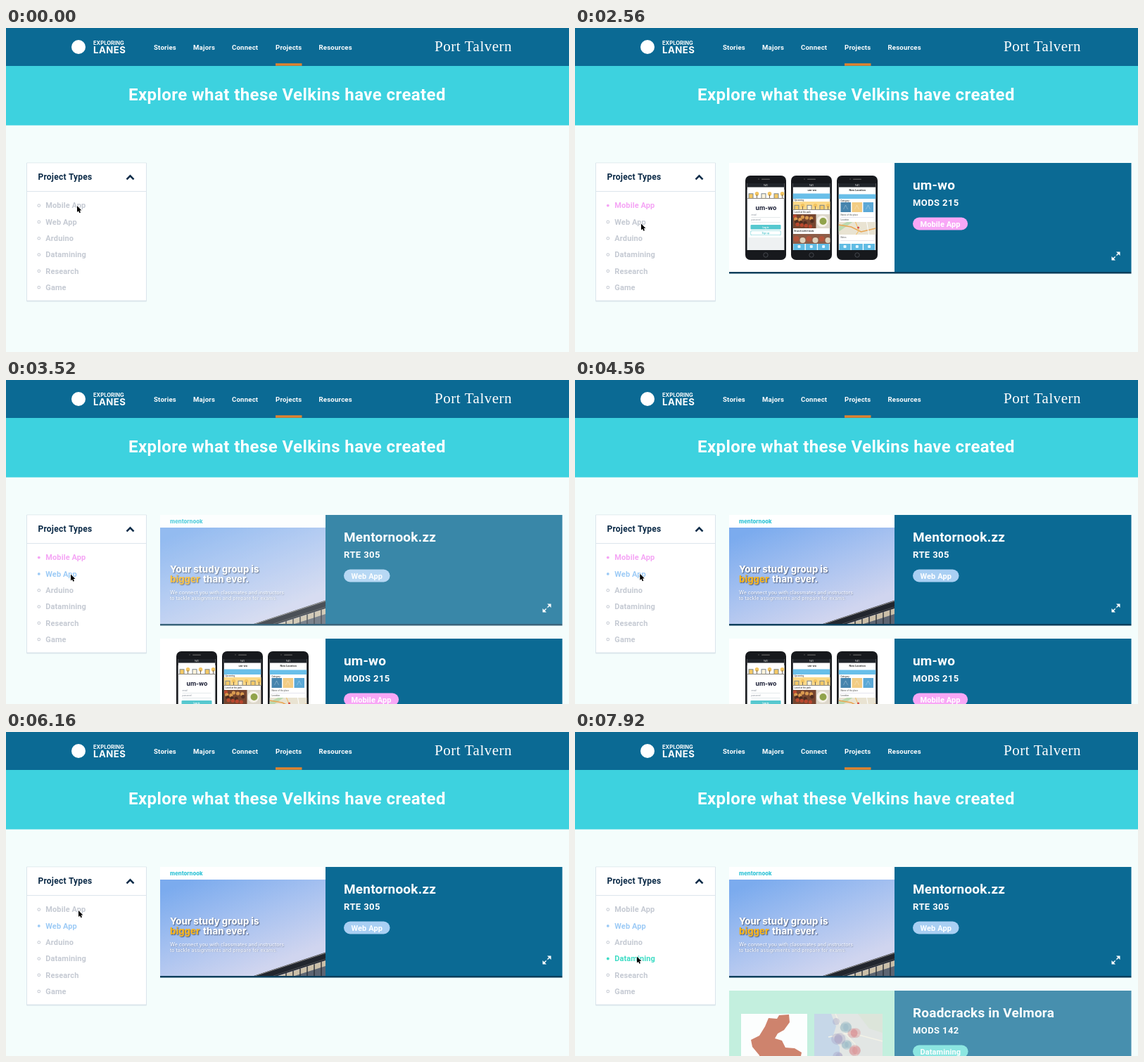
Recreate the animation shown at these times as an HTML page with a canvas. Size 800 px wide and 461 px high, loop 8 s.

```html
<!DOCTYPE html>
<html lang="en">
<head>
<meta charset="utf-8">
<title>Project browser</title>
<style>
  html, body { margin: 0; width: 100%; height: 100%; overflow: hidden; background: #f4fdfc; }
  canvas { display: block; width: 800px; height: 461px; }
</style>
</head>
<body>
<canvas id="stage" width="800" height="461"></canvas>
<script>
const LOOP = 8000, FADE = 400;
const CLICK = { mobileOn: 400, webOn: 3200, mobileOff: 5280, dataOn: 7624 };
const STEP = 176;
const BLUE = '#0b6a94', GRAY = '#c5cad3', PINK = '#f5a5f5', SKY = '#9dcbf6', TEAL = '#3fdcc5';
const ROBOTO = 'Roboto, sans-serif', INTER = 'Inter, sans-serif';
const ctx = document.getElementById('stage').getContext('2d');

function text(c, str, x, y, size, color, spacing = 0, family = ROBOTO, weight = 700) {
  c.font = `${weight} ${size}px ${family}`;
  c.letterSpacing = spacing + 'px';
  c.fillStyle = color;
  c.fillText(str, x, y);
}

function box(c, x, y, w, h, color, r = 0) {
  c.fillStyle = color;
  c.beginPath();
  c.roundRect(x, y, w, h, r);
  c.fill();
}

function dot(c, x, y, r, color) {
  c.fillStyle = color;
  c.beginPath();
  c.arc(x, y, r, 0, Math.PI * 2);
  c.fill();
}

function trace(c, pts) {
  c.beginPath();
  for (let i = 0; i < pts.length; i += 2) c.lineTo(pts[i], pts[i + 1]);
}

function shape(c, pts, color) {
  trace(c, pts);
  c.fillStyle = color;
  c.fill();
}

function line(c, pts, color, width) {
  trace(c, pts);
  c.strokeStyle = color;
  c.lineWidth = width;
  c.stroke();
}

function gradient(c, x0, y0, x1, y1, ...colors) {
  const g = c.createLinearGradient(x0, y0, x1, y1);
  colors.forEach((col, i) => g.addColorStop(i / (colors.length - 1), col));
  return g;
}

function town(c, x, y, h, back) {
  box(c, x, y, 54, h, back);
  for (let i = 0; i < 6; i++) {
    const px = x + 2 + i * 9, top = y + h * (i % 2 ? .3 : .4);
    if (i % 2) {
      dot(c, px + 3, top + 2, 2.8, '#f3c561');
      box(c, px + 2.5, top + 3, 1, y + h - top - 3, '#76685b');
    } else {
      box(c, px, top, 7, y + h - top, '#78848c');
      box(c, px + 1, top + 1, 5, y + h - top - 1, i % 4 ? '#fff4dc' : '#f5c966');
    }
  }
  box(c, x, y + h - 1, 54, 1, '#8f8a80');
}

function tiles(c, x) {
  for (let i = 0; i < 3; i++) {
    box(c, x + 1 + i * 17.3, 307, 16, 9, '#61bce4');
    box(c, x + 7 + i * 17.3, 309, 4, 4, '#e4f6ff', 1);
  }
}

function loginScreen(c, x) {
  town(c, x, 230, 13, '#fff');
  box(c, x, 243, 53, 73, '#eef1f2');
  box(c, x + 2, 243, 49, 55, '#fff');
  text(c, 'um-wo', x + 12, 259, 9.5, '#20243a', .1);
  text(c, 'email', x + 6, 267, 3, '#8a929c', 0, ROBOTO, 400);
  box(c, x + 6, 269, 41, .6, '#ccd3d8');
  text(c, 'password', x + 6, 274, 3, '#8a929c', 0, ROBOTO, 400);
  box(c, x + 6, 276, 41, .6, '#ccd3d8');
  box(c, x + 5, 280, 43, 6.5, '#56c8cf', 1);
  text(c, 'Log in', x + 22, 284.5, 3.2, '#fff');
  box(c, x + 5, 288.5, 43, 6.5, '#6fd0d6', 1);
  box(c, x + 5.6, 289.1, 41.8, 5.3, '#fff', 1);
  text(c, 'Sign up', x + 21, 293, 3.2, '#56c8cf');
}

function feedScreen(c, x) {
  text(c, 'um-wo', x + 21, 232, 4, '#333');
  box(c, x, 235.5, 53, 7.5, '#69bfe9');
  text(c, 'Upcoming', x + 2, 246, 3, '#666');
  town(c, x, 247, 12, '#fbd989');
  text(c, 'Lunch at the park', x + 2, 263, 3, '#666');
  box(c, x, 265, 53, 20, '#75452f');
  box(c, x + 33, 265, 20, 20, '#ddd7cb');
  dot(c, x + 42, 275, 8, '#f6f2e9');
  dot(c, x + 43, 275, 5, '#91a34b');
  for (let i = 0; i < 14; i++)
    dot(c, x + 3 + i * 7.3 % 28, 268 + i * 4.7 % 15, 2.6, ['#b9472e', '#d99a4f', '#4e2c20'][i % 3]);
  text(c, 'Brunch with friends', x + 2, 290, 3.2, '#444');
  box(c, x, 293, 53, 14, '#8d5d48');
  for (let i = 0; i < 6; i++) dot(c, x + 5 + i * 9, 300 + i % 2 * 2, 4, i % 2 ? '#dfd2bd' : '#b4553c');
  tiles(c, x);
}

function placeScreen(c, x) {
  text(c, 'New Location', x + 15, 232, 3.8, '#333');
  box(c, x, 236.5, 53, 6.5, '#69bfe9');
  text(c, 'Category', x + 3, 246.5, 3, '#666');
  ['#4684ad', '#f2cc83', '#5ba8d6'].forEach((col, i) => {
    box(c, x + 3 + i * 16, 248, 14.5, 14, col);
    line(c, [x + 7 + i * 16, 258, x + 10 + i * 16, 252, x + 13 + i * 16, 258], '#ffffff60', .8);
  });
  text(c, 'Name of the place', x + 3, 267, 3, '#888');
  box(c, x + 3, 269, 47, .5, '#ccd');
  text(c, 'Location', x + 3, 274, 3, '#888');
  box(c, x, 276, 53, 18, '#e9e3d2');
  shape(c, [x, 282, x + 12, 276, x + 20, 276, x, 290], '#bcd9b0');
  line(c, [x, 280, x + 18, 283, x + 32, 290, x + 53, 285], '#eaa653', 1.6);
  line(c, [x + 24, 276, x + 29, 288, x + 25, 294], '#f3c36f', 1.2);
  line(c, [x + 40, 276, x + 43, 294], '#fff', 1);
  dot(c, x + 28, 284, 1.6, '#d74f48');
  text(c, 'Notes', x + 3, 299, 3, '#888');
  box(c, x + 3, 302, 47, .5, '#ccd');
  tiles(c, x);
}

function phone(c, x, screen) {
  box(c, x, 210, 58, 120, '#17191d', 7);
  box(c, x + 23, 214.5, 12, 1.4, '#555', .7);
  dot(c, x + 19, 215, .9, '#444');
  c.strokeStyle = '#50535a';
  c.lineWidth = .8;
  c.beginPath();
  c.arc(x + 29, 323, 3.2, 0, 7);
  c.stroke();
  c.save();
  c.beginPath();
  c.rect(x + 2.5, 221, 53, 95);
  c.clip();
  box(c, x + 2.5, 221, 53, 95, '#fff');
  box(c, x + 2.5, 221, 53, 5.5, '#20242a');
  text(c, '9:41', x + 26, 225.3, 3, '#ccc');
  screen(c, x + 2.5);
  c.restore();
}

function phonesPicture(c) {
  box(c, 219, 192, 235, 155, '#fff');
  [loginScreen, feedScreen, placeScreen].forEach((s, i) => phone(c, 242 + i * 65, s));
}

function sitePicture(c) {
  box(c, 219, 192, 235, 155, gradient(c, 275, 205, 335, 350, '#7babee', '#a6c1f0', '#d0d5ef'));
  box(c, 219, 192, 235, 18, '#fff');
  text(c, 'mentornook', 233, 204, 7.7, '#2fc3d6', 0, INTER, 800);
  shape(c, [388, 347, 454, 325, 454, 347], '#cbbfa8');
  shape(c, [410, 347, 454, 333, 454, 347], '#5d6572');
  for (let i = 0; i < 6; i++) line(c, [398 + i * 10, 347, 398 + i * 10, 343 - i * 3.2], '#2a2f38', 1.4);
  shape(c, [352, 347, 454, 313.5, 454, 325, 386, 347], '#22262e');
  line(c, [354, 347, 454, 314.5], '#8d8a88', 1);
  line(c, [380, 347, 454, 323], '#56585e', .8);
  c.shadowColor = '#263552c0';
  c.shadowOffsetX = c.shadowOffsetY = 1;
  c.shadowBlur = 1.5;
  text(c, 'Your study group is', 233, 274, 13.2, '#fff', 0, INTER, 800);
  text(c, 'bigger', 233, 288, 13.2, '#f9b51e', 0, INTER, 800);
  text(c, 'than ever.', 280, 288, 13.2, '#fff', 0, INTER, 800);
  c.shadowColor = '#26355270';
  c.shadowOffsetX = c.shadowOffsetY = .5;
  text(c, 'We connect you with classmates and instructors', 233, 305, 7, '#f6f8ff', 0, INTER, 500);
  text(c, 'to tackle assignments and prepare for exams.', 233, 312.5, 7, '#f6f8ff', 0, INTER, 500);
  c.shadowColor = 'transparent';
}

function mapPicture(c) {
  box(c, 219, 192, 235, 155, '#b2ebd4');
  box(c, 236, 225, 94, 100, '#fff');
  shape(c, [275, 231, 287, 232, 290, 227, 304, 226, 305, 237, 297, 248, 288, 253, 284, 260, 294, 263,
    299, 273, 312, 274, 322, 280, 318, 300, 264, 300, 262, 284, 252, 272, 250, 262, 262, 256, 270, 243], '#c2593c');
  box(c, 340, 225, 97, 100, '#dcdfdc');
  shape(c, [340, 225, 364, 225, 371, 243, 366, 258, 376, 272, 376, 325, 340, 325], '#b7cbe2');
  shape(c, [402, 225, 437, 225, 437, 252, 418, 246], '#d4ddcf');
  line(c, [370, 225, 381, 250, 398, 268, 402, 300], '#f4efe0', 1.4);
  line(c, [360, 258, 392, 252, 437, 264], '#f4efe0', 1.4);
  for (let i = 0; i < 18; i++)
    dot(c, 371 + i * 11.7 % 34, 236 + i * 8.3 % 50, 5 + i % 4, ['#8a7fb060', '#6f9db060', '#cf5f6560'][i % 3]);
}

function makeCard(title, course, tag, tagColor, picture) {
  const cv = document.createElement('canvas');
  cv.width = 800;
  cv.height = 461;
  const c = cv.getContext('2d');
  picture(c);
  box(c, 454, 192, 336.5, 155, BLUE);
  box(c, 219, 347, 571.5, 2.5, '#0b3f5c');
  text(c, title, 480, 230, 19, '#fff', .2);
  text(c, course, 480, 253, 13, '#fff', .4);
  c.font = `700 11px ${ROBOTO}`;
  c.letterSpacing = '.1px';
  box(c, 480, 269.5, c.measureText(tag).width + 21, 18, tagColor, 9);
  text(c, tag, 490.5, 282.5, 11, '#fff', .1);
  line(c, [764.5, 328.5, 772.5, 320.5], '#fff', 1.4);
  shape(c, [769, 318.5, 774.5, 318.5, 774.5, 324], '#fff');
  shape(c, [762.5, 325, 762.5, 330.5, 768, 330.5], '#fff');
  box(c, 767.3, 323.3, 2.4, 2.4, BLUE);
  return cv;
}

const phones = makeCard('um-wo', 'MODS 215', 'Mobile App', '#f8a7f6', phonesPicture);
const site = makeCard('Mentornook.zz', 'RTE 305', 'Web App', '#a9cff3', sitePicture);
const map = makeCard('Roadcracks in Velmora', 'MODS 142', 'Datamining', '#69dfd8', mapPicture);

function drawHeader() {
  box(ctx, 0, 54, 800, 84.4, '#3dd2df');
  box(ctx, 0, 0, 800, 54, BLUE);
  dot(ctx, 103, 27, 10, '#fff');
  text(ctx, 'EXPLORING', 124, 24, 7.6, '#fff', 0, INTER);
  text(ctx, 'LANES', 124, 36, 13.2, '#fff', .5, INTER);
  [['Stories', 210], ['Majors', 266], ['Connect', 321], ['Projects', 383], ['Resources', 444.5]]
    .forEach(([s, x]) => text(ctx, s, x, 31.3, 9.6, '#fff', .2));
  box(ctx, 383, 50.3, 37.5, 3.4, '#e0832f');
  text(ctx, 'Port Talvern', 609, 33, 21, '#fff', .5, '"Liberation Serif", serif', 400);
  text(ctx, 'Explore what these Velkins have created', 174, 102.5, 24, '#fff', .42);
}

function drawSidebar(t) {
  box(ctx, 29, 191.5, 171, 198, '#dbe5ec', 1);
  box(ctx, 30, 192.3, 169, 195.2, '#fff');
  box(ctx, 30, 232, 169, 1, '#dce5ec');
  text(ctx, 'Project Types', 45.5, 216.3, 12, '#0c2b48', .22);
  line(ctx, [171.5, 215.3, 176.5, 210.3, 181.5, 215.3], '#0c2b48', 2.6);
  const items = [
    ['Mobile App', PINK, t >= CLICK.mobileOn && t < CLICK.mobileOff],
    ['Web App', SKY, t >= CLICK.webOn],
    ['Arduino'],
    ['Datamining', TEAL, t >= CLICK.dataOn],
    ['Research'],
    ['Game']
  ];
  items.forEach(([name, color, on], i) => {
    const y = 256.3 + i * 23.3;
    dot(ctx, 46.8, y - 3.7, on ? 1.9 : 2.3, on ? color : GRAY);
    if (!on) dot(ctx, 46.8, y - 3.7, 1.3, '#fff');
    text(ctx, name, 56.3, y, 11, on ? color : GRAY, .1);
  });
}

function drawCard(card, dy, alpha) {
  if (alpha <= 0) return;
  ctx.globalAlpha = alpha;
  ctx.drawImage(card, 0, dy);
  ctx.globalAlpha = 1;
}

const ramp = (t, start) => Math.min(1, Math.max(0, (t - start) / FADE));

function drawCards(t) {
  drawCard(site, 0, ramp(t, CLICK.webOn));
  drawCard(phones, t < CLICK.webOn ? 0 : STEP, ramp(t, CLICK.mobileOn) - ramp(t, CLICK.mobileOff));
  drawCard(map, STEP, ramp(t, CLICK.dataOn));
}

// time, x, y
const path = [
  [0, 101, 253], [1900, 101, 253], [2400, 94, 278.5], [2600, 94, 278.5], [2950, 92, 276.5],
  [4500, 92, 276.5], [5100, 103, 254], [6200, 103, 254], [6900, 88, 319.5], [8000, 88, 319.5]
];

function drawCursor(t) {
  const i = path.findIndex(p => p[0] > t);
  const [t0, x0, y0] = path[i - 1], [t1, x1, y1] = path[i];
  const k = (t - t0) / (t1 - t0), e = k * k * (3 - 2 * k);
  ctx.save();
  ctx.translate(x0 + (x1 - x0) * e, y0 + (y1 - y0) * e);
  trace(ctx, [0, 0, 0, 9, 2, 7.2, 3.4, 10.3, 5, 9.6, 3.7, 6.6, 6.4, 6.4]);
  ctx.closePath();
  ctx.strokeStyle = '#fff';
  ctx.lineWidth = 1.2;
  ctx.stroke();
  ctx.fillStyle = '#000';
  ctx.fill();
  ctx.restore();
}

function draw(t) {
  box(ctx, 0, 0, 800, 461, '#f4fdfc');
  drawHeader();
  drawSidebar(t);
  drawCards(t);
  drawCursor(t);
}

let start;
function tick(now) {
  start ??= now;
  draw(Math.max(0, now - start) % LOOP);
  requestAnimationFrame(tick);
}
draw(0);
requestAnimationFrame(tick);
</script>
</body>
</html>
```
